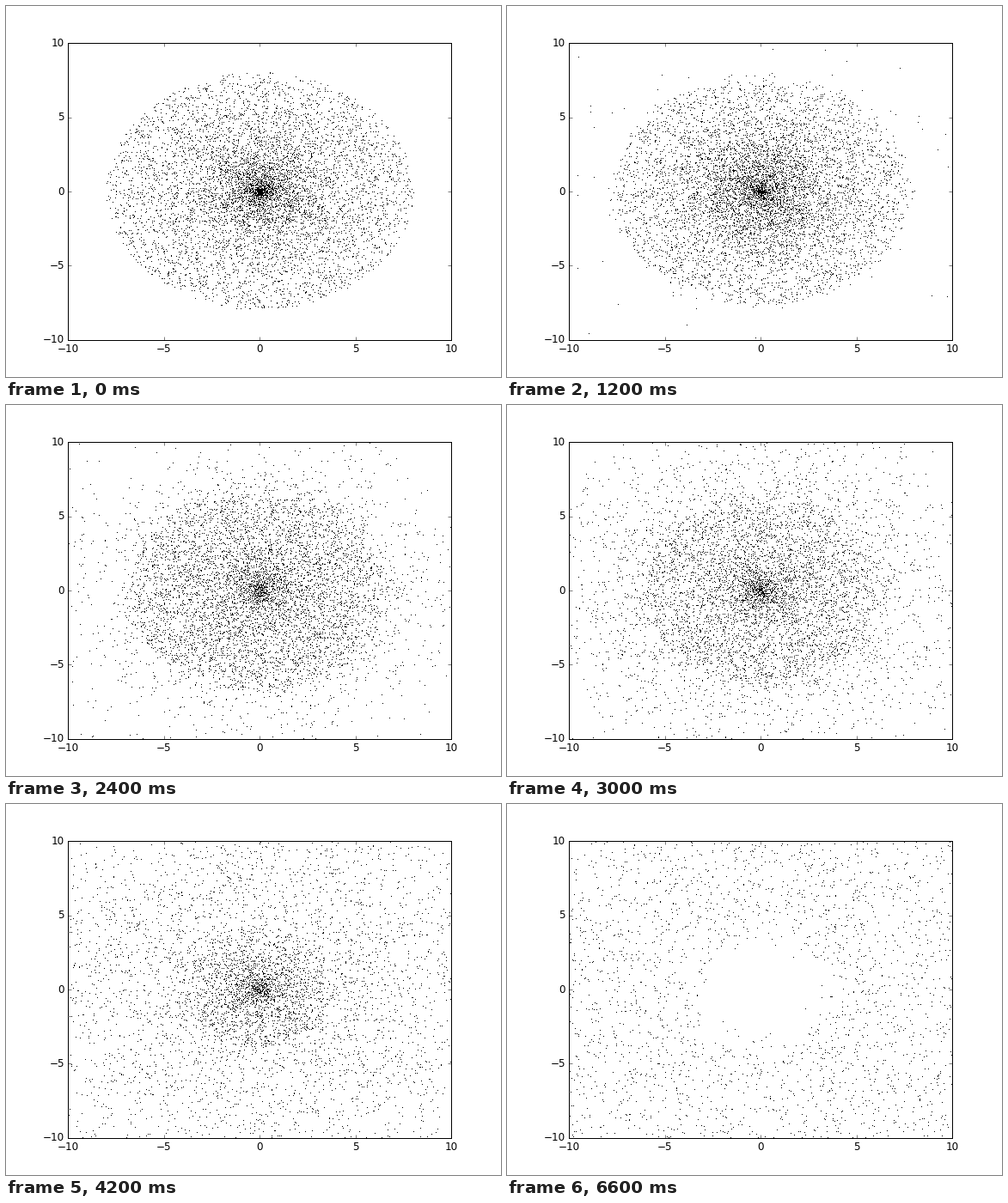
Write a matplotlib script that moves like this. It is 576 px wide and 432 px high and loops after 6.75 s.

```python
import numpy as np
import matplotlib.pyplot as plt
from matplotlib.animation import FuncAnimation

plt.style.use("classic")
plt.rcParams.update({"font.family": "DejaVu Sans", "font.size": 12})

N = 7000
FRAMES, INTERVAL = 45, 150
RADIUS = 8.0
FALL_TIME = 34.0  # steps until the outermost points reach the centre

rng = np.random.default_rng(7)
r0 = RADIUS * rng.random(N)
theta = 2 * np.pi * rng.random(N)
heading = np.column_stack([np.cos(theta), np.sin(theta)])
drift = rng.normal(0, 0.02, (N, 2))

# Free fall takes longer from further out; afterwards each point flies on.
t_fall = FALL_TIME * (r0 / RADIUS) ** 1.5 + 1e-9
speed = 0.25 + rng.gamma(2, 0.13, N)
fast = rng.random(N) < 0.06
speed[fast] = rng.uniform(0.8, 2.5, fast.sum())

# Radial free fall in parametric form: time and radius, both from 0 to 1.
beta = np.linspace(0, np.pi / 2, 400)
fall_t = (beta + np.sin(2 * beta) / 2) * 2 / np.pi
fall_r = np.cos(beta) ** 2


def positions(step):
    inward = r0 * np.interp(step / t_fall, fall_t, fall_r)
    outward = speed * (step - t_fall)
    r = np.where(step < t_fall, inward, -outward)
    return heading * r[:, None] + drift * min(step, 12)


fig = plt.figure(figsize=(8, 6), dpi=72, facecolor="white")
ax = fig.add_axes([0.125, 0.1, 0.775, 0.8])
ax.set(xlim=(-10, 10), ylim=(-10, 10),
       xticks=range(-10, 11, 5), yticks=range(-10, 11, 5))
dots, = ax.plot([], [], "k,")


def update(step):
    dots.set_data(*positions(step).T)
    return dots,


anim = FuncAnimation(fig, update, frames=FRAMES, interval=INTERVAL,
                     repeat=True, repeat_delay=0)
plt.show()
```
